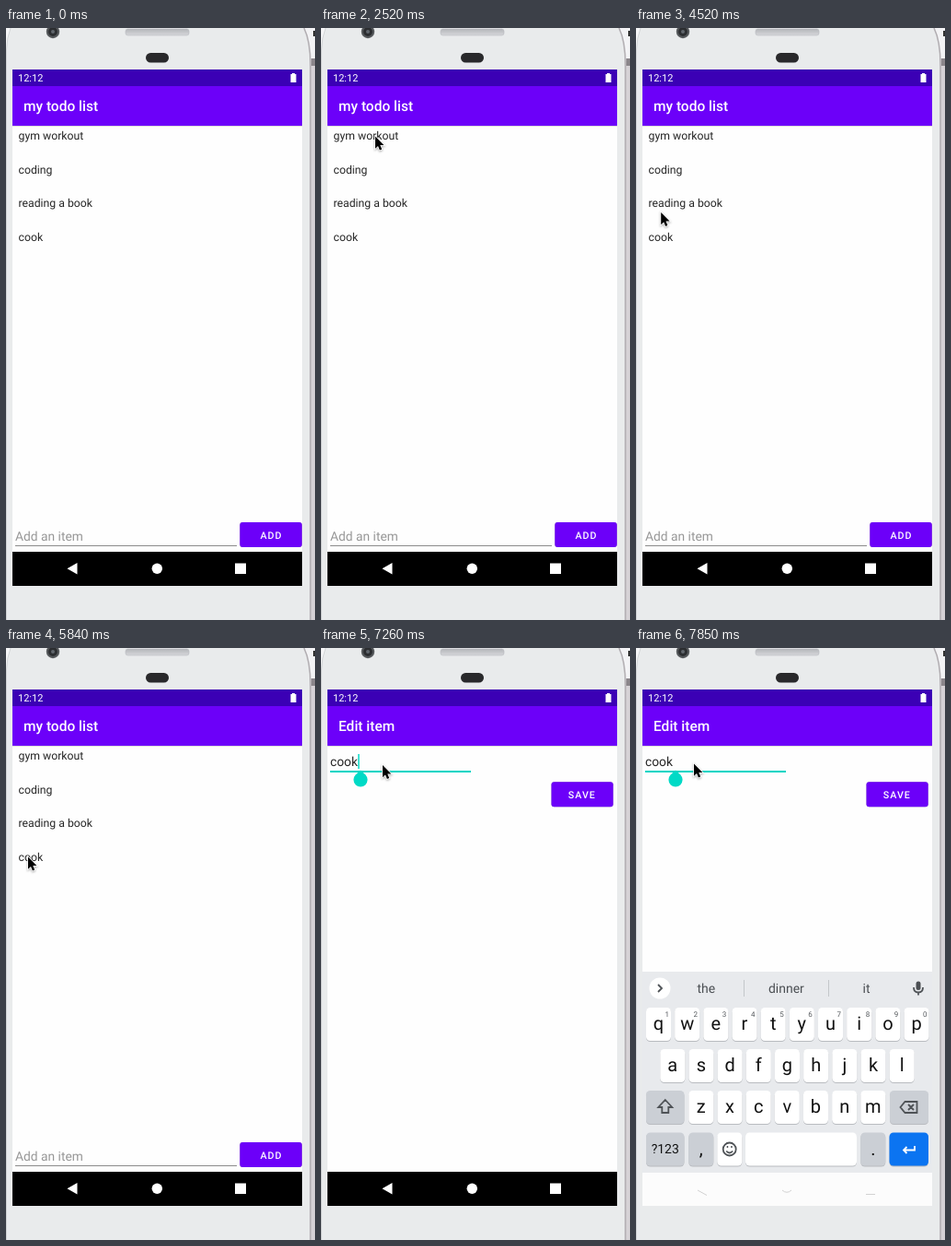
An HTML page for the animation above (8000 ms loop, 336 px wide and 642 px high).

```html
<!DOCTYPE html>
<html lang="en">
<head>
<meta charset="utf-8">
<title>Todo list</title>
<style>
html, body { margin: 0; width: 100%; height: 100%; overflow: hidden; background: #e9ebec; }
svg { display: block; width: 100%; height: 100%; font-family: Roboto, sans-serif; }
.title { font: 500 15.5px Roboto, sans-serif; fill: #fff; }
.item { font-size: 12.25px; fill: #262626; }
.field { font-size: 13.8px; }
.button { font: 500 10.7px Roboto, sans-serif; letter-spacing: .96px; fill: #fff; }
.raised { fill: #6c00f9; filter: drop-shadow(0 .8px .7px #0005); }
.icon { fill: none; stroke: #4f5357; stroke-width: 1.8; }
.letter { font-size: 20px; text-anchor: middle; fill: #111; }
.digit { font-size: 8px; text-anchor: middle; fill: #55595d; }
.word { font-size: 14px; text-anchor: middle; fill: #4b4f53; }
</style>
</head>
<body>
<svg viewBox="0 0 336 642" text-rendering="geometricPrecision">
  <defs>
    <clipPath id="screen"><path d="M7 45h315v560H7z"/></clipPath>
    <linearGradient id="speaker" x2="0" y2="1">
      <stop stop-color="#b4b6ba"/><stop offset="1" stop-color="#d6d7da"/>
    </linearGradient>
  </defs>

  <!-- phone body -->
  <path fill="#e9ebec" d="M0 0h336v642H0z"/>
  <path fill="#f6f6f7" d="M0 0h5Q1 10 0 24z"/>
  <path fill="none" stroke="#d3d5d7" d="M5 0Q1 10 .5 24V642"/>
  <path fill="#d6d2d6" d="M324 0h12v642h-5V40Q331 14 324 0z"/>
  <path fill="#f3f3f5" d="M324 0h12v33h-5Q330 12 324 0z"/>
  <path fill="none" stroke="#b0acb0" stroke-width="1.500" d="M324 0Q331 14 331 40V642"/>
  <path fill="#8b868b" d="M332 33h4v8h-4z"/>
  <path fill="#333" d="M334 3h2v6h-2z"/>
  <circle cx="51" cy="4" r="7.200" fill="#55585b"/>
  <circle cx="51" cy="4" r="5" fill="#2c2e31"/>
  <circle cx="51" cy="4" r="2" fill="#61666d"/>
  <rect x="130" y="1" width="69" height="7" rx="2.500" fill="url(#speaker)" stroke="#b9bbbf" stroke-width=".6"/>
  <rect x="152" y="27" width="25" height="10.500" rx="5.200" fill="#29292b"/>

  <g clip-path="url(#screen)">
    <path d="M7 45h315v560H7z"/>

    <g id="list">
      <path fill="#fefefe" d="M7 45h315v523H7z"/>
      <path fill="#3b00b5" d="M7 45h315v18H7z"/>
      <path fill="#6c00f9" d="M7 63h315v43H7z"/>
      <path fill="#0002" d="M7 106h315v1H7z"/>
      <text class="title" x="19" y="90.300">my todo list</text>
      <g id="items"></g>
      <text class="field" x="10" y="555.500" fill="#979797">Add an item</text>
      <path stroke="#8b8b8b" d="M10 561.500H251"/>
      <rect class="raised" x="254.300" y="536" width="67.500" height="27" rx="3"/>
      <text class="button" x="276.500" y="553.500">ADD</text>
    </g>

    <g id="edit">
      <path fill="#fefefe" d="M7 45h315v523H7z"/>
      <path fill="#3b00b5" d="M7 45h315v18H7z"/>
      <path fill="#6c00f9" d="M7 63h315v43H7z"/>
      <path fill="#0002" d="M7 106h315v1H7z"/>
      <text class="title" x="19" y="90.300">Edit item</text>
      <text class="field" x="10" y="127.700" fill="#262626">cook</text>
      <path id="underline" d="M10 134H163"/>
      <rect class="raised" x="250.500" y="145.300" width="67.200" height="27" rx="3"/>
      <text class="button" x="268.800" y="162.800">SAVE</text>
      <path id="caret" stroke="#00dac6" stroke-width="1.500" d="M41 115v16"/>
      <path id="handle" fill="#00dac6" d="M43 132.500l5.400 5a7.600 7.600 0 1 1-10.800 0z"/>
    </g>

    <text x="13" y="58" font-size="11" fill="#fff">12:12</text>
    <path fill="#fff" d="M311 49h3v1h1.500v9h-6v-9h1.500z"/>
    <path fill="#fff" d="M66.500 586.300l11-6.200v12.400zM249 580.500h12v11.500h-12z"/>
    <circle cx="164.300" cy="586.300" r="5.700" fill="#fff"/>

    <g id="keyboard">
      <path fill="#e8eaed" d="M7 351h315v254H7z"/>
      <path fill="#fcfcfc" d="M7 569h315v36H7z"/>
      <path fill="none" stroke="#d2d2d2" d="M67 588l10 5.500M159 588q5 4.500 10 0M250 592.500h10"/>
      <circle cx="26" cy="369" r="11.500" fill="#fff"/>
      <g id="tools" class="icon">
        <path d="M28 365l-4 4 4 4M70 371l5 5M119 373v-10h-11v12h8zM115 375v-4h4M110.500 370q2.500 3 5 0M111 366.500h1M114.500 366.500h1M199.500 363.500h11v12h-11zM203 362.500h4M202 368h6M202 371.500h5"/>
        <circle cx="67" cy="368" r="4.300"/>
        <text x="149" y="373" font-size="11" font-weight="900" fill="#4f5357" stroke="none">GIF</text>
        <path stroke="#d8dadc" stroke-width="1" d="M233.500 360v18"/>
        <path stroke-width="3" stroke-linecap="round" d="M255.500 369h0M260.500 369h0M265.500 369h0"/>
      </g>
      <g id="words">
        <path class="icon" d="M24 365l4 4-4 4"/>
        <path stroke="#c4c7ca" d="M117.500 360v18M209.500 360v18"/>
        <text class="word" x="76.400" y="374">the</text>
        <text class="word" x="163.400" y="374">dinner</text>
        <text class="word" x="250.600" y="374">it</text>
      </g>
      <rect x="304.500" y="361.500" width="5" height="9.500" rx="2.500" fill="#4b4f53"/>
      <path class="icon" d="M302 368q0 5.500 5 5.500t5-5.500M307 373.500v3"/>
      <g id="keys"></g>
      <path class="icon" d="M31.800 490l7.500 8h-4v6h-7v-6h-4zM287.500 498l5-6h13v12h-13zM296 495l6 6M302 495l-6 6"/>
      <circle class="icon" cx="101.700" cy="543.500" r="7"/>
      <path class="icon" d="M98.200 545.500q3.500 4 7 0M98.700 541h1.500M103.200 541h1.500"/>
      <path class="icon" style="stroke:#fff" d="M303 540v4.500h-12M294.500 541l-3.500 3.500 3.500 3.500"/>
    </g>
  </g>

  <path id="cursor" d="M0 0V13.200L3 10.400 4.900 15 7.200 14 5.300 9.500H9.400Z"
        stroke="#fff" stroke-width="1.600" paint-order="stroke" style="filter:drop-shadow(0 1px 1px #0005)"/>
</svg>

<script>
const $ = id => document.getElementById(id);
const LOOP = 8000, TICK = 117, PITCH = 31.17;

$('items').innerHTML = ['gym workout', 'coding', 'reading a book', 'cook']
  .map((label, i) => `<text class="item" x="13.500" y="${121 + i * 36.7}">${label}</text>`).join('');

function key(x, y, width, color = '#fff', label = '', size = 20) {
  const box = (top, fill) =>
    `<rect x="${x}" y="${top}" width="${width}" height="36" rx="4.500" fill="${fill}"/>`;
  return box(y + 1, '#b9bcc0') + box(y, color) +
    `<text class="letter" style="font-size:${size}px" x="${x + width / 2}" y="${y + 18 + size * .32}">${label}</text>`;
}

function keyRow(letters, x, y) {
  return [...letters].map((letter, i) => key(x + i * PITCH, y, 27, '#fff', letter)).join('');
}

const GRAY = '#cbcfd5';
$('keys').innerHTML =
  keyRow('qwertyuiop', 11, 390) + keyRow('asdfghjkl', 26.3, 435) + keyRow('zxcvbnm', 57.3, 480) +
  [...'1234567890'].map((d, i) => `<text class="digit" x="${33.7 + i * PITCH}" y="400">${d}</text>`).join('') +
  key(11, 480, 41.5, GRAY) + key(276, 480, 42, GRAY) +
  key(11, 525.5, 41.5, GRAY, '?123', 14) + key(57.3, 525.5, 27, GRAY, ',') + key(88.3, 525.5, 27) +
  key(119, 525.5, 121) + key(244.3, 525.5, 27, GRAY, '.') + key(275.5, 525.5, 42.5, '#0b74f1');

// Pointer moves: start, x, y, end, x, y
const moves = [
  [500, 296, 547, 1080, 62, 95],
  [1200, 55, 103, 1200, 55, 103],
  [1320, 54, 120, 1440, 57, 130],
  [1560, 58, 119, 1560, 58, 119],
  [2520, 59, 117.5, 3100, 28, 153],
  [3340, 28, 157, 3810, 28, 188],
  [4520, 27.2, 200, 4880, 22, 233],
  [5000, 23, 230, 5120, 23.5, 228],
  [5840, 24, 226.5, 5840, 24, 226.5],
  [6430, 24, 226.5, 6900, 74, 130],
  [7260, 67, 127, 7380, 63, 125.5]
];

function stepped(t, start, end) {
  if (end === start) return 1;
  const count = Math.max(1, Math.round((end - start) / TICK));
  return Math.min(1, Math.max(0, Math.floor((t - start + 4) / (end - start) * count) / count));
}

const show = (id, visible) => $(id).setAttribute('visibility', visible ? 'inherit' : 'hidden');
const shift = (id, x, y) => $(id).setAttribute('transform', `translate(${x} ${y})`);
const fade = (id, alpha) => $(id).setAttribute('opacity', alpha);

function drawCursor(t) {
  const move = moves.findLast(m => t >= m[0]);
  show('cursor', move);
  if (!move) return;
  const [start, x0, y0, end, x1, y1] = move;
  const p = stepped(t, start, end);
  shift('cursor', x0 + (x1 - x0) * p, y0 + (y1 - y0) * p);
}

function drawPages(t) {
  const settled = t >= 6430, entering = t >= 6200;
  const opening = t < 6320 ? .5 : .92;
  show('list', !settled);
  show('edit', entering);
  shift('list', 0, entering ? -12 * opening : 0);
  shift('edit', 0, settled ? 0 : 24 * (1 - opening));
  fade('edit', settled ? 1 : opening);

  const focused = t >= 7020;
  $('underline').setAttribute('stroke', focused ? '#00d5c4' : '#8b8b8b');
  $('underline').setAttribute('stroke-width', focused ? 2 : 1);
  show('handle', t >= 7260);
  show('caret', t >= 7260 && t < 7610);
}

function drawKeyboard(t) {
  const open = t >= 7850;
  const rising = t >= 7730;
  show('keyboard', t >= 7610);
  show('tools', t >= 7610 && !open);
  show('words', open);
  fade('keyboard', open ? 1 : rising ? .85 : .32);
  shift('keyboard', 0, open ? 0 : rising ? 28 : 143);
}

const begin = performance.now();
function frame() {
  const t = (performance.now() - begin) % LOOP;
  drawPages(t);
  drawKeyboard(t);
  drawCursor(t);
  requestAnimationFrame(frame);
}
frame();
</script>
</body>
</html>
```
